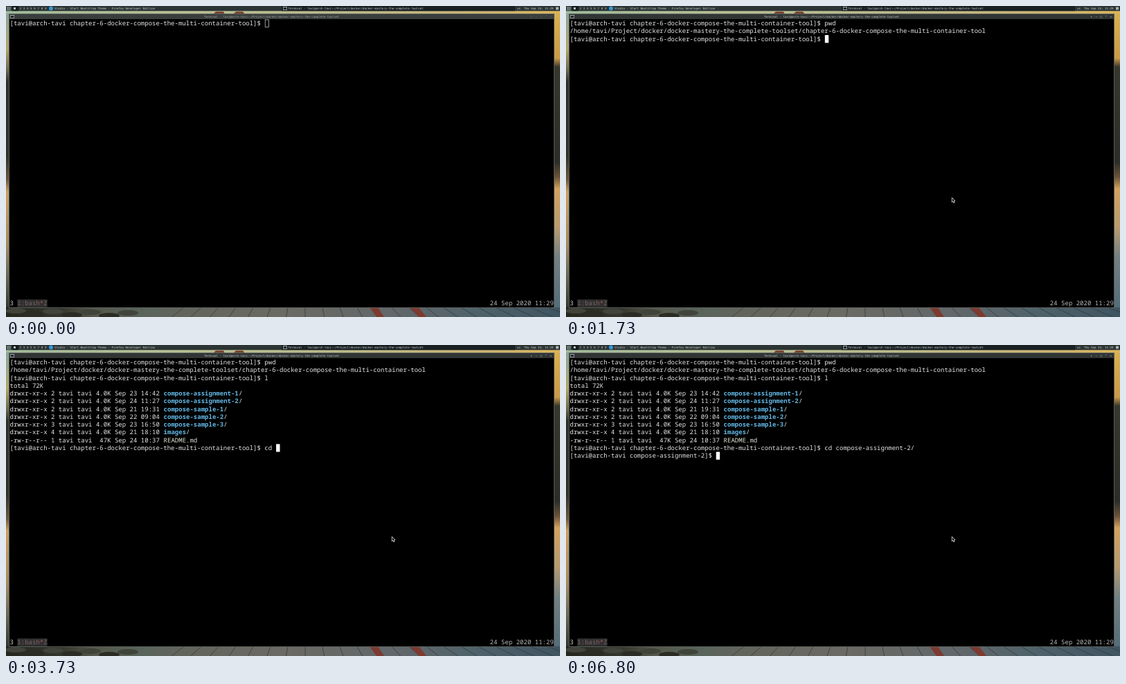
Recreate the animation shown at these times as an HTML page with a canvas. Size 800 by 450 pixels, loop 8 s.

```html
<!DOCTYPE html>
<html lang="en">
<head>
<meta charset="utf-8">
<title>Terminal session</title>
<style>
  html, body { margin: 0; width: 100%; height: 100%; overflow: hidden; background: #000; }
  canvas { display: block; width: 800px; height: 450px; }
</style>
</head>
<body>
<canvas id="stage" width="800" height="450"></canvas>
<script>
const ctx = document.getElementById('stage').getContext('2d');
const LOOP = 8000;
const CELL_W = 65 / 12, CELL_H = 11.25, LEFT = 5.5, TOP = 19.6;
const MONO = '"Noto Sans Mono", monospace';
const TERM_FONT = `9.03px ${MONO}`, BOLD_FONT = `bold 9.03px ${MONO}`;
const TINY_FONT = '4.16px "DejaVu Sans Mono", monospace';
const FOCUS_AT = 200, POINTER_START = 130, POINTER_END = 870;

const USER = 'tavi';
const CHAPTER = 'chapter-6-docker-compose-the-multi-container-tool';
const COURSE = 'Project/docker/docker-mastery-the-complete-toolset';
const TITLE = `Terminal - ${USER}@arch-${USER}:~/${COURSE}`;

const entry = (mode, links, size, date, name) =>
  [`${mode} ${links} ${USER} ${USER} ${size} Sep ${date} `, name];
const folder = (links, date, name) => entry('drwxr-xr-x', links, '4.0K', date, name + '/');

// Each command: what has been typed by a given time, when it is run, what it prints.
const session = [
  { dir: CHAPTER, typed: [[1330, 'p'], [1600, 'pw'], [1665, 'pwd']], run: 1730,
    output: [[`/home/${USER}/${COURSE}/${CHAPTER}`]] },
  { dir: CHAPTER, typed: [[2530, 'l']], run: 2730,
    output: [
      ['total 72K'],
      folder(2, '23 14:42', 'compose-assignment-1'),
      folder(2, '24 11:27', 'compose-assignment-2'),
      folder(2, '21 19:31', 'compose-sample-1'),
      folder(2, '22 09:04', 'compose-sample-2'),
      folder(3, '23 16:50', 'compose-sample-3'),
      folder(4, '21 18:10', 'images'),
      entry('-rw-r--r--', 1, ' 47K', '24 10:37', 'README.md'),
    ] },
  { dir: CHAPTER, run: 6670, output: [],
    typed: [[3530, 'c'], [3600, 'cd'], [3730, 'cd '], [4270, 'cd c'], [4330, 'cd co'],
      [4400, 'cd com'], [4530, 'cd compose-'], [5330, 'cd compose-a'], [5600, 'cd compose-as'],
      [5730, 'cd compose-assignment-'], [6070, 'cd compose-assignment-2'],
      [6270, 'cd compose-assignment-2/']] },
  { dir: 'compose-assignment-2', typed: [], run: Infinity, output: [] },
];

function rect(x, y, w, h, color) {
  ctx.fillStyle = color;
  ctx.fillRect(x, y, w, h);
}

function shape(color, ...points) {
  ctx.fillStyle = color;
  ctx.beginPath();
  for (const [x, y] of points) ctx.lineTo(x, y);
  ctx.closePath();
  ctx.fill();
}

function gradient(x, y, w, h, vertical, stops) {
  const g = vertical ? ctx.createLinearGradient(0, y, 0, y + h) : ctx.createLinearGradient(x, 0, x + w, 0);
  for (const [at, color] of stops) g.addColorStop(at, color);
  rect(x, y, w, h, g);
}

function text(str, x, y, color, font) {
  ctx.font = font;
  ctx.fillStyle = color;
  ctx.fillText(str, x, y);
}

const cellX = col => LEFT + col * CELL_W;
const cellY = row => TOP + row * CELL_H;
const put = (str, col, row, color = '#e4e4e4', font = TERM_FONT) =>
  text(str, cellX(col), cellY(row) + 8.6, color, font);

function drawWallpaper() {
  gradient(0, 7, 800, 6, false, [[0, '#9fb89a'], [.3, '#b5bd92'], [.6, '#b9b88a'], [.85, '#c9b474'], [1, '#d9b45c']]);
  shape('#7a4636', [299, 12], [303, 8], [314, 8], [316, 12]);
  shape('#7a4636', [328, 12], [332, 8], [342, 8], [345, 12]);
  gradient(0, 11, 6, 430, true, [[0, '#86a79a'], [.12, '#b3a66c'], [.19, '#6d6a4c'], [.23, '#2e3228'],
    [.48, '#33352b'], [.56, '#6d5a3c'], [.6, '#c9a065'], [.78, '#a58a62'], [.88, '#6b6a58'], [1, '#30342c']]);
  gradient(790, 11, 10, 430, true, [[0, '#d8b053'], [.15, '#c99a48'], [.18, '#37372d'], [.5, '#2c2d27'],
    [.55, '#6b5238'], [.59, '#d2a25e'], [.72, '#b79a70'], [.82, '#738182'], [1, '#526b78']]);

  gradient(0, 436, 800, 14, false, [[0, '#25271f'], [.1, '#35372d'], [.16, '#55584a'], [.25, '#59645c'],
    [.31, '#62655b'], [.5, '#6b6a63'], [.7, '#62676a'], [.85, '#4f626b'], [1, '#3f5561']]);
  for (let i = 0; i < 7; i++) {
    ctx.fillStyle = i % 2 ? '#2b2d25' : '#41443a';
    ctx.beginPath();
    ctx.ellipse(14 + i * 27, 441 + (i * 5) % 9, 15, 4, 0, 0, 7);
    ctx.fill();
  }
  ctx.strokeStyle = '#343a3a';
  ctx.lineWidth = .8;
  for (let x = 250; x < 810; x += 26) {
    ctx.beginPath();
    ctx.moveTo(x + (430 - x) * .04, 436);
    ctx.lineTo(x - (430 - x) * .06, 450);
    ctx.stroke();
  }
  shape('#7d3a30', [525, 436], [537, 436], [546, 450], [535, 450]);
  shape('#7d3a30', [583, 436], [596, 436], [607, 450], [596, 450]);
}

function drawPanel() {
  rect(0, 0, 800, 7.2, '#2c3434');
  rect(398, 0, 337, 7.2, '#192023');
  rect(1, 1, 6, 5.5, '#60776d');
  rect(9, 0, 9, 7.2, '#151b1d');
  rect(11, 2, 3, 3, '#b8bebc');
  for (let n = 2; n <= 9; n++) text(String(n), 19.5 + (n - 2) * 5.2, 5, '#c4caca', TINY_FONT);
  ctx.fillStyle = '#3298d8';
  ctx.beginPath();
  ctx.arc(65, 3.6, 3, 0, 7);
  ctx.fill();
  text('Studio - Start Bootstrap Theme - Firefox Developer Edition', 70, 5, '#d0d5d5', TINY_FONT);
  drawWindowIcon(400, 1);
  text(TITLE, 407.5, 5, '#d0d5d5', TINY_FONT);
  text('us', 738, 5, '#c4caca', TINY_FONT);
  text('Thu Sep 24, 11:29', 748, 5, '#d0d5d5', TINY_FONT);
  rect(794, 1.5, 4, 4, '#a8b3b2');
}

function drawWindowIcon(x, y) {
  rect(x, y, 6, 5, '#aeb4b4');
  rect(x + .7, y + .9, 4.6, 3.4, '#20272a');
}

function drawWindow(focused) {
  rect(4, 11, 788, 426, '#565b59');
  rect(5, 12, 786, 7, focused ? '#303534' : '#393e3d');
  rect(5, 19, 786, 417, '#000');
  drawWindowIcon(6, 13);
  text(TITLE, 286, 17, focused ? '#c9cecd' : '#a4a9a8', TINY_FONT);
  const color = focused ? '#c9cecd' : '#626766';
  ['+', '−', '□', '^', '×'].forEach((mark, i) => text(mark, 757.5 + i * 7, 17, color, TINY_FONT));
}

function drawOutput([plain, name], row) {
  put(plain, 0, row);
  if (!name) return;
  const isFolder = name.endsWith('/');
  const label = isFolder ? name.slice(0, -1) : name;
  put(label, plain.length, row, isFolder ? '#63b8e6' : '#e4e4d8', isFolder ? BOLD_FONT : TERM_FONT);
  if (isFolder) put('/', plain.length + label.length, row);
}

function drawCaret(col, row, focused) {
  const x = cellX(col), y = cellY(row);
  if (focused) return rect(x, y, CELL_W, CELL_H, '#fff');
  ctx.strokeStyle = '#d8d8d8';
  ctx.lineWidth = .7;
  ctx.strokeRect(x + .35, y + .35, CELL_W - .2, CELL_H - .7);
}

function drawSession(t, focused) {
  let row = 0;
  for (const { dir, typed, run, output } of session) {
    const command = typed.filter(([at]) => t >= at).pop()?.[1] ?? '';
    const line = `[${USER}@arch-${USER} ${dir}]$ ${command}`;
    put(line, 0, row);
    if (t < run) return drawCaret(line.length, row, focused);
    row++;
    for (const item of output) drawOutput(item, row++);
  }
}

function drawStatus() {
  put('3', 0, 36, '#c4c4c4');
  rect(cellX(2), cellY(36), CELL_W * 8, CELL_H, '#303030');
  put('1:bash', 2, 36, '#806467');
  put('*', 8, 36, '#c05058');
  put('Z', 9, 36, '#806467');
  put('24 Sep 2020 11:29', 128, 36, '#b8b8b8');
}

function drawPointer(t) {
  if (t < POINTER_START) return;
  const p = Math.min(1, (t - POINTER_START) / (POINTER_END - POINTER_START));
  const rest = (1 - p) ** 3;
  ctx.save();
  ctx.translate(557.3 + 243 * rest, 277.2 + 40 * rest);
  ctx.beginPath();
  for (const [x, y] of [[0, 0], [0, 6.8], [1.5, 5.4], [2.6, 7.8], [3.8, 7.2], [2.8, 5], [4.7, 4.8]]) ctx.lineTo(x, y);
  ctx.closePath();
  ctx.fillStyle = '#111';
  ctx.fill();
  ctx.strokeStyle = '#e8e8e8';
  ctx.lineWidth = .8;
  ctx.stroke();
  ctx.restore();
}

function draw() {
  const t = performance.now() % LOOP;
  const focused = t >= FOCUS_AT;
  ctx.textRendering = 'geometricPrecision';
  drawWallpaper();
  drawPanel();
  drawWindow(focused);
  drawSession(t, focused);
  drawStatus();
  drawPointer(t);
  requestAnimationFrame(draw);
}
draw();
</script>
</body>
</html>
```
